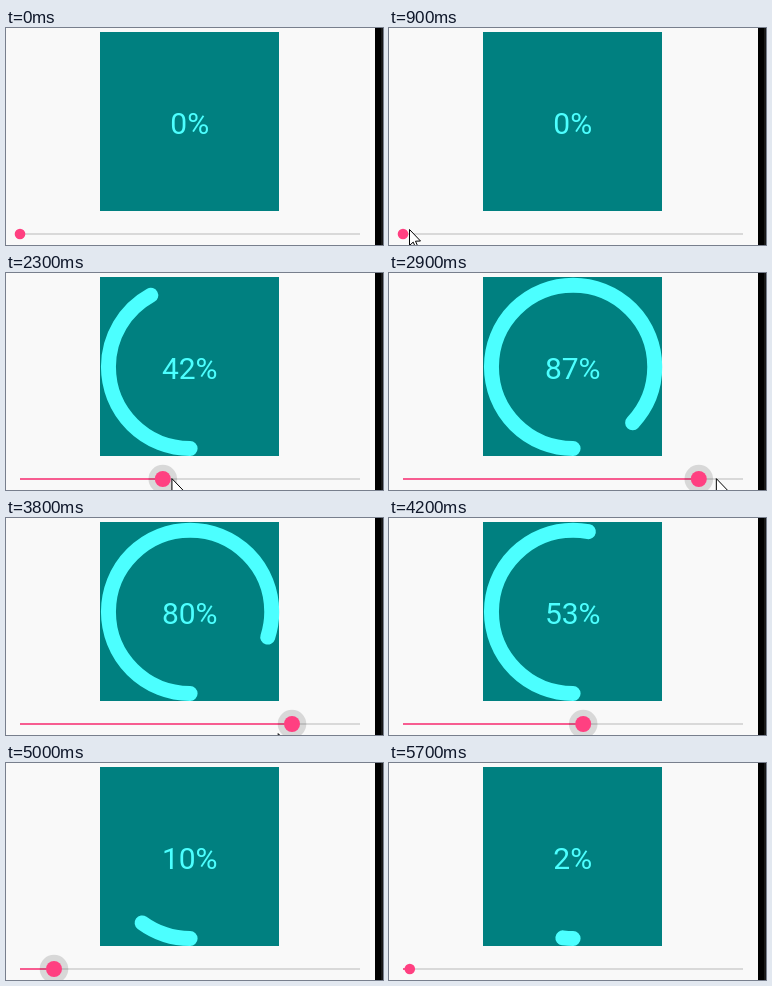
Animation, 377 px wide and 217 px high, one loop 6300 ms. Source, as an HTML page with a canvas:

```html
<!DOCTYPE html>
<html lang="en">
<head>
<meta charset="utf-8">
<title>Circular progress with slider</title>
<style>
  html, body { margin: 0; width: 100%; height: 100%; overflow: hidden; background: #f9f9f9; }
  canvas { display: block; }
</style>
</head>
<body>
<canvas id="stage" width="377" height="217"></canvas>
<script>
const ctx = document.getElementById('stage').getContext('2d');
const TICK = 100, TICKS = 63;
const CYAN = '#4cffff', PINK = '#ff4081';
const DIAL = { x: 184.1, y: 93.85, radius: 81.65 };
const TRACK = { left: 14, width: 340, y: 206 };
const ARROW = new Path2D('M.5 .5v16l3.7-3.4 2.6 5.9 2.3-1-2.6-5.8 5-.2z');

// Goes from 0 to 1 between two ticks; power > 1 eases out, < 1 eases in.
function glide(tick, from, to, power = 1) {
  const t = Math.min(1, Math.max(0, (tick - from) / (to - from)));
  return 1 - (1 - t) ** power;
}

// The thumb is dragged up to 100 %, then back down in three pulls.
function percentAt(tick) {
  return Math.round(
    26 * glide(tick, 15, 22, 0.76) + 16 * glide(tick, 22, 23) + 58 * glide(tick, 23, 32, 1.36)
    - 54 * glide(tick, 35, 43) - 37 * glide(tick, 44, 51, 1.83) - 7 * glide(tick, 52, 54));
}

const pressAt = tick => glide(tick, 15, 17) - glide(tick, 55, 57);
const thumbX = percent => TRACK.left + TRACK.width * percent / 100;

// The pointer flies in, nudges towards the thumb, then runs slightly ahead of it and sinks away.
function cursorAt(tick) {
  const arrive = glide(tick, 1, 7, 1.3);
  const y = 136 + 65 * arrive + 4.5 * glide(tick, 15, 18) + 10 / 3 * Math.max(0, tick - 35);
  if (tick <= 15) {
    return [235 - 211 * arrive - 4 * glide(tick, 7, 9) - 4 * glide(tick, 11, 13), y];
  }
  const x = thumbX(percentAt(tick));
  return [tick <= 35 ? Math.min(352, x * 1.055) : x * 0.95, y];
}

function rect(color, x, y, w, h) {
  ctx.fillStyle = color;
  ctx.fillRect(x, y, w, h);
}

function disc(color, x, y, r) {
  ctx.fillStyle = color;
  ctx.beginPath();
  ctx.arc(x, y, r, 0, Math.PI * 2);
  ctx.fill();
}

function drawDial(percent) {
  rect('#008080', 94, 4, 179, 179);
  if (percent > 0) {
    ctx.strokeStyle = CYAN;
    ctx.lineWidth = 15;
    ctx.lineCap = 'round';
    ctx.beginPath();
    ctx.arc(DIAL.x, DIAL.y, DIAL.radius, Math.PI / 2, Math.PI / 2 + percent / 100 * Math.PI * 2);
    ctx.stroke();
  }
  ctx.fillStyle = CYAN;
  ctx.font = '30px Roboto, sans-serif';
  ctx.textAlign = 'center';
  ctx.fillText(percent + '%', 183.75, 106);
}

function drawSlider(percent, press) {
  const { left, width, y } = TRACK;
  const x = thumbX(percent);
  rect('#d2d2d2', left, y - 0.8, width, 1.6);
  rect(PINK, left, y - 0.8, x - left, 1.6);
  if (press > 0) disc(`rgba(0,0,0,${0.13 * press})`, x, y, 8 + 6.3 * press);
  disc(PINK, x, y, 5.3 + 2.7 * press);
}

function drawCursor(x, y) {
  ctx.save();
  ctx.translate(x, y);
  ctx.fillStyle = '#fff';
  ctx.fill(ARROW);
  ctx.strokeStyle = '#000';
  ctx.lineWidth = 1;
  ctx.stroke(ARROW);
  ctx.restore();
}

function draw(now) {
  const tick = Math.floor(now / TICK) % TICKS;
  const percent = percentAt(tick);
  rect('#f9f9f9', 0, 0, 377, 217);
  rect('#000', 369, 0, 8, 217);
  rect('#191919', 375, 0, 2, 217);
  drawDial(percent);
  drawSlider(percent, pressAt(tick));
  if (tick > 0) drawCursor(...cursorAt(tick));
}

const start = performance.now();
function loop() {
  draw(performance.now() - start);
  requestAnimationFrame(loop);
}
loop();
</script>
</body>
</html>
```
